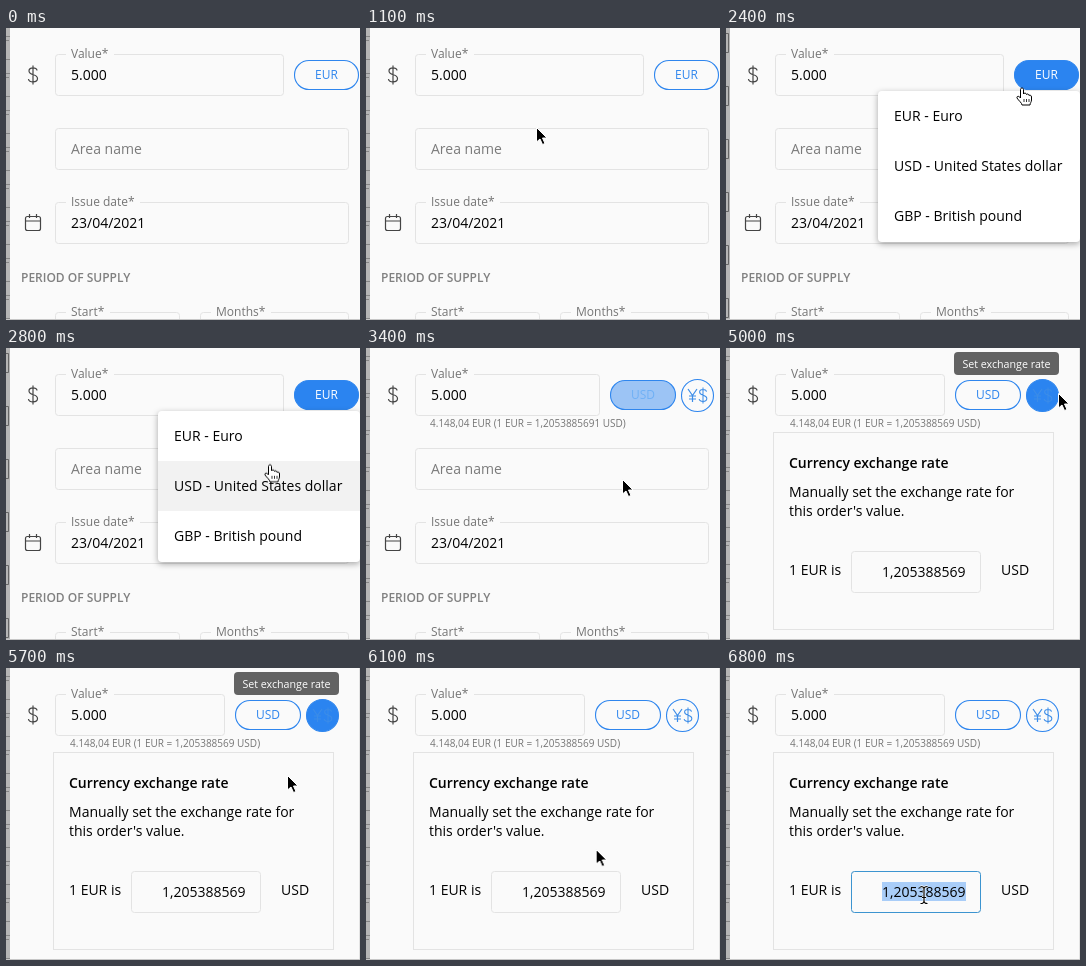
Write an HTML page that moves like this. It is 354x292 px and loops after 8 s.

```html
<!DOCTYPE html>
<html lang="en">
<head>
<meta charset="utf-8">
<title>Currency form</title>
<style>
  html, body { margin: 0; width: 100%; height: 100%; overflow: hidden; background: #fafafa; }
  svg { display: block; width: 354px; height: 292px; font: 14px "Open Sans", sans-serif; }
  .box { fill: none; stroke: #e3e3e3; }
  .gap { fill: #fafafa; }
  .label { font-size: 12px; fill: #757575; }
  .hint { font-size: 10px; fill: #757575; }
  .muted { fill: #7b7b7b; }
  .head { font-size: 12px; font-weight: 600; fill: #808080; }
  .bold { font-weight: 600; }
  .mid { text-anchor: middle; }
  .end { text-anchor: end; }
  .icon { fill: none; stroke: #444; stroke-width: 1.2; }
  .blue { fill: #2b84f0; fill-opacity: 0; stroke: #2f86ee; stroke-width: 1.1; }
  .btn { font-size: 12px; fill: #2f86ee; text-anchor: middle; }
  .sign { fill: none; stroke: #3b8ce8; stroke-width: 1.2; }
  .tip text { font-size: 10.7px; fill: #fff; }
  .menu { filter: drop-shadow(0 2px 3px #0005); }

  .t { animation: 8s step-end infinite; }
  .form { animation-name: form; }
  .euro { animation-name: euro; }
  .euro-fill { animation-name: euro-fill; }
  .euro-text { animation-name: euro-text; }
  .page-b { animation-name: page-b; opacity: 0; }
  .menu { animation-name: menu; }
  .row1 { animation-name: row1; }
  .row2 { animation-name: row2; }
  .value { animation-name: value; }
  .tools { animation-name: tools; }
  .usd-fill { animation-name: usd-fill; }
  .usd-text { animation-name: usd-text; }
  .rate-fill { animation-name: rate-fill; }
  .tip { animation-name: tip; }
  .long { animation-name: long; }
  .panel { animation-name: panel; }
  .focus { animation-name: focus; }
  .sel { animation-name: sel; }
  .cursor { animation-name: cursor; }
  .arrow { animation-name: arrow; }
  .hand { animation-name: hand; }
  .beam { animation-name: beam; }

  @keyframes form { 0% { opacity: 1 } 61.25%, 100% { opacity: 0 } }
  @keyframes euro { 0% { opacity: 1 } 41.25%, 100% { opacity: 0 } }
  @keyframes euro-fill { 0% { fill-opacity: 0 } 17.5% { fill-opacity: .5 } 18.75%, 100% { fill-opacity: 1 } }
  @keyframes euro-text { 0% { fill: #2f86ee } 17.5%, 100% { fill: #fff } }
  @keyframes page-b { 0% { opacity: 0 } 26.25% { opacity: 1 } 41.25%, 100% { opacity: 0 } }
  @keyframes menu { 0% { opacity: 0 } 26.25% { opacity: 1 } 41.25% { opacity: .5 } 42.5%, 100% { opacity: 0 } }
  @keyframes row1 { 0% { opacity: 0 } 31.25% { opacity: 1 } 35%, 100% { opacity: 0 } }
  @keyframes row2 { 0% { opacity: 0 } 35%, 100% { opacity: 1 } }
  @keyframes value { 0% { width: 228px } 41.25% { width: 184px } 61.25%, 100% { width: 169px } }
  @keyframes tools {
    0% { opacity: 0; transform: none }
    41.25% { opacity: 1; transform: none }
    61.25%, 100% { opacity: 1; transform: translateX(-15px) }
  }
  @keyframes usd-fill { 0% { fill-opacity: 1 } 42.5% { fill-opacity: .45 } 43.75%, 100% { fill-opacity: 0 } }
  @keyframes usd-text { 0% { fill: #fff } 42.5% { fill: #6fb0f5 } 43.75%, 100% { fill: #2f86ee } }
  @keyframes rate-fill {
    0% { fill-opacity: 0 } 57.5% { fill-opacity: .5 } 58.75% { fill-opacity: 1 }
    72.5% { fill-opacity: .5 } 73.75%, 100% { fill-opacity: 0 }
  }
  @keyframes tip { 0% { opacity: 0 } 58.75% { opacity: 1 } 72.5% { opacity: .5 } 73.75%, 100% { opacity: 0 } }
  @keyframes long { 0% { opacity: 0 } 41.25% { opacity: 1 } 61.25%, 100% { opacity: 0 } }
  @keyframes panel { 0% { opacity: 0 } 61.25% { opacity: .5 } 62.5%, 100% { opacity: 1 } }
  @keyframes focus { 0% { opacity: 0 } 80% { opacity: .5 } 81.25%, 100% { opacity: 1 } }
  @keyframes sel { 0% { opacity: 0 } 83.75%, 100% { opacity: 1 } }

  /* The pointer advances ten times a second. */
  @keyframes cursor {
    0% { opacity: 0; transform: translate(16px, 147px) }
    8.75% { opacity: 1; transform: translate(16px, 147px); animation-timing-function: steps(4) }
    13.75% { opacity: 1; transform: translate(170px, 99px); animation-timing-function: steps(4) }
    18.75% { opacity: 1; transform: translate(305px, 49px) }
    30% { opacity: 1; transform: translate(296px, 60px); animation-timing-function: steps(5) }
    36.25% { opacity: 1; transform: translate(256px, 131px) }
    47.5% { opacity: 1; transform: translate(256px, 131px); animation-timing-function: steps(9) }
    58.75% { opacity: 1; transform: translate(332px, 45px) }
    67.5% { opacity: 1; transform: translate(332px, 45px); animation-timing-function: steps(3) }
    71.25% { opacity: 1; transform: translate(281px, 107px); animation-timing-function: steps(6) }
    78.75% { opacity: 1; transform: translate(204px, 218px) }
    80%, 100% { opacity: 1; transform: translate(198px, 227px) }
  }
  @keyframes arrow { 0% { opacity: 1 } 18.75% { opacity: 0 } 41.25% { opacity: 1 } 78.75%, 100% { opacity: 0 } }
  @keyframes hand { 0% { opacity: 0 } 18.75% { opacity: 1 } 41.25%, 100% { opacity: 0 } }
  @keyframes beam { 0% { opacity: 0 } 78.75%, 100% { opacity: 1 } }
</style>
</head>
<body>
<svg viewBox="0 0 354 292">
  <defs>
    <pattern id="ticks" width="4" height="37" y="8" patternUnits="userSpaceOnUse">
      <rect width="4" height="37" fill="#b5b5b5"/>
      <path d="M0 .5H4M0 4.5H3M0 23.5H4" stroke="#858585"/>
    </pattern>
    <pattern id="boxes" width="4" height="53" y="4" patternUnits="userSpaceOnUse">
      <rect width="4" height="53" fill="#b5b5b5"/>
      <path d="M0 1.5H2.5V20.5H0" fill="none" stroke="#666"/>
    </pattern>
    <path id="dollar" d="M4 -4.5C4 -8 -4 -8 -4 -4C-4 1 4.5 -1.500 4.500 3.500C4.500 8 -4.500 8 -4.500 4M0 -9.500V9.500"/>
  </defs>

  <rect width="354" height="292" fill="#fafafa"/>
  <rect width="4" height="292" fill="url(#ticks)"/>
  <rect class="t page-b" width="4" height="292" fill="url(#boxes)"/>

  <use href="#dollar" class="icon" x="27" y="47"/>
  <rect class="box t value" x="49.5" y="26.5" width="228" height="41" rx="3"/>
  <rect class="gap" x="60" y="25" width="48" height="3"/>
  <text class="label" x="65" y="30">Value*</text>
  <text x="65" y="52">5.000</text>

  <g class="t form">
    <rect class="box" x="49.500" y="100.500" width="293" height="41" rx="3"/>
    <text class="muted" x="65" y="126">Area name</text>

    <g class="icon">
      <rect x="19.500" y="188.500" width="15" height="14" rx="2"/>
      <path d="M19.500 193H34.500M23.500 186V190M30.500 186V190"/>
    </g>
    <rect class="box" x="49.500" y="174.500" width="293" height="41" rx="3"/>
    <rect class="gap" x="60" y="173" width="74" height="3"/>
    <text class="label" x="65" y="178">Issue date*</text>
    <text x="65" y="200">23/04/2021</text>

    <text class="head" x="15" y="254">PERIOD OF SUPPLY</text>
    <rect class="box" x="49.500" y="284.500" width="124" height="41" rx="3"/>
    <rect class="box" x="194.500" y="284.500" width="148" height="41" rx="3"/>
    <path d="M60 284.500H104M205 284.500H265" stroke="#fafafa" stroke-width="3"/>
    <text class="label" x="65" y="288">Start*</text>
    <text class="label" x="210" y="288">Months*</text>
  </g>

  <g class="t euro">
    <rect class="blue t euro-fill" x="288.500" y="32.500" width="64" height="29" rx="14.500"/>
    <text class="btn t euro-text" x="320.500" y="51">EUR</text>
  </g>

  <text class="hint t long" x="64" y="79">4.148,04 EUR (1 EUR = 1,2053885691 USD)</text>

  <g class="t panel">
    <path d="M353.500 0V292" stroke="#e3e3e3"/>
    <text class="hint" x="64" y="79">4.148,04 EUR (1 EUR = 1,205388569 USD)</text>
    <rect class="box" x="47.500" y="84.500" width="280" height="197"/>
    <text class="bold" x="63" y="120">Currency exchange rate</text>
    <text x="63" y="149">Manually set the exchange rate for</text>
    <text x="63" y="168">this order's value.</text>
    <text x="63" y="227">1 EUR is</text>
    <rect class="box" x="125.500" y="203.500" width="129" height="41" rx="3"/>
    <rect class="t focus" x="125.500" y="203.500" width="129" height="41" rx="3" fill="none" stroke="#3c94d0"/>
    <rect class="t sel" x="156" y="214" width="84" height="19" fill="#a9cdf8"/>
    <text class="end" x="239.500" y="229">1,205388569</text>
    <text x="275" y="227">USD</text>
  </g>

  <g class="t tools">
    <rect class="blue t usd-fill" x="244.500" y="32.500" width="65" height="29" rx="14.500"/>
    <text class="btn t usd-text" x="277" y="51">USD</text>
    <circle class="blue t rate-fill" cx="331.500" cy="47.500" r="16"/>
    <g class="sign" transform="translate(331.500 47.500)">
      <path d="M-9.500 -6.500L-5 0L-.5 -6.500M-5 0V6.500M-8.500 .5H-1.500M-8.500 3.500H-1.500"/>
      <use href="#dollar" transform="translate(5.500 0) scale(.85)"/>
    </g>
    <g class="t tip">
      <rect x="243" y="4" width="105" height="23" rx="4" fill="#636363"/>
      <text class="mid" x="295.500" y="19.500">Set exchange rate</text>
    </g>
  </g>

  <path d="M0 291.500H354" stroke="#c6c6c6"/>

  <g class="t menu">
    <rect x="152" y="63" width="202" height="151" rx="4" fill="#fff"/>
    <rect class="t row1" x="152" y="63" width="202" height="50" fill="#f2f2f2"/>
    <rect class="t row2" x="152" y="113" width="202" height="50" fill="#f2f2f2"/>
    <text x="168" y="93">EUR - Euro</text>
    <text x="168" y="143">USD - United States dollar</text>
    <text x="168" y="193">GBP - British pound</text>
  </g>

  <g class="t cursor">
    <path class="t arrow" d="M.5 .5V15L4 12L6.500 17.500L9 16.500L6.500 11H11Z" stroke="#fff"/>
    <g class="t hand" stroke="#000" stroke-linejoin="round">
      <path d="M-1.500 10V1.500C-1.500 -.5 1.500 -.5 1.500 1.500V6C2 4.500 4.500 5 4.500 6.500C5 5.500 7 6 7 7.500C8 6.500 9.500 7.500 9.500 9V12C9.500 14 8 15 8 17H0C0 15 -3.500 12.500 -5 10C-5.500 8 -3 7.500 -1.500 10Z" fill="#fff"/>
      <path d="M2 11V14M4.500 11V14M7 11V14" stroke-width=".8"/>
    </g>
    <g class="t beam" fill="none">
      <path id="ibeam" d="M-3.500 -8.500Q0 -8.500 0 -6Q0 -8.500 3.500 -8.500M0 -6V6M-3.500 8.500Q0 8.500 0 6Q0 8.500 3.500 8.500M-2 2.500H2" stroke="#fff" stroke-width="2.500"/>
      <path d="M-3.500 -8.500Q0 -8.500 0 -6Q0 -8.500 3.500 -8.500M0 -6V6M-3.500 8.500Q0 8.500 0 6Q0 8.500 3.500 8.500M-2 2.500H2" stroke="#000" stroke-width="1.200"/>
    </g>
  </g>
</svg>
</body>
</html>
```
